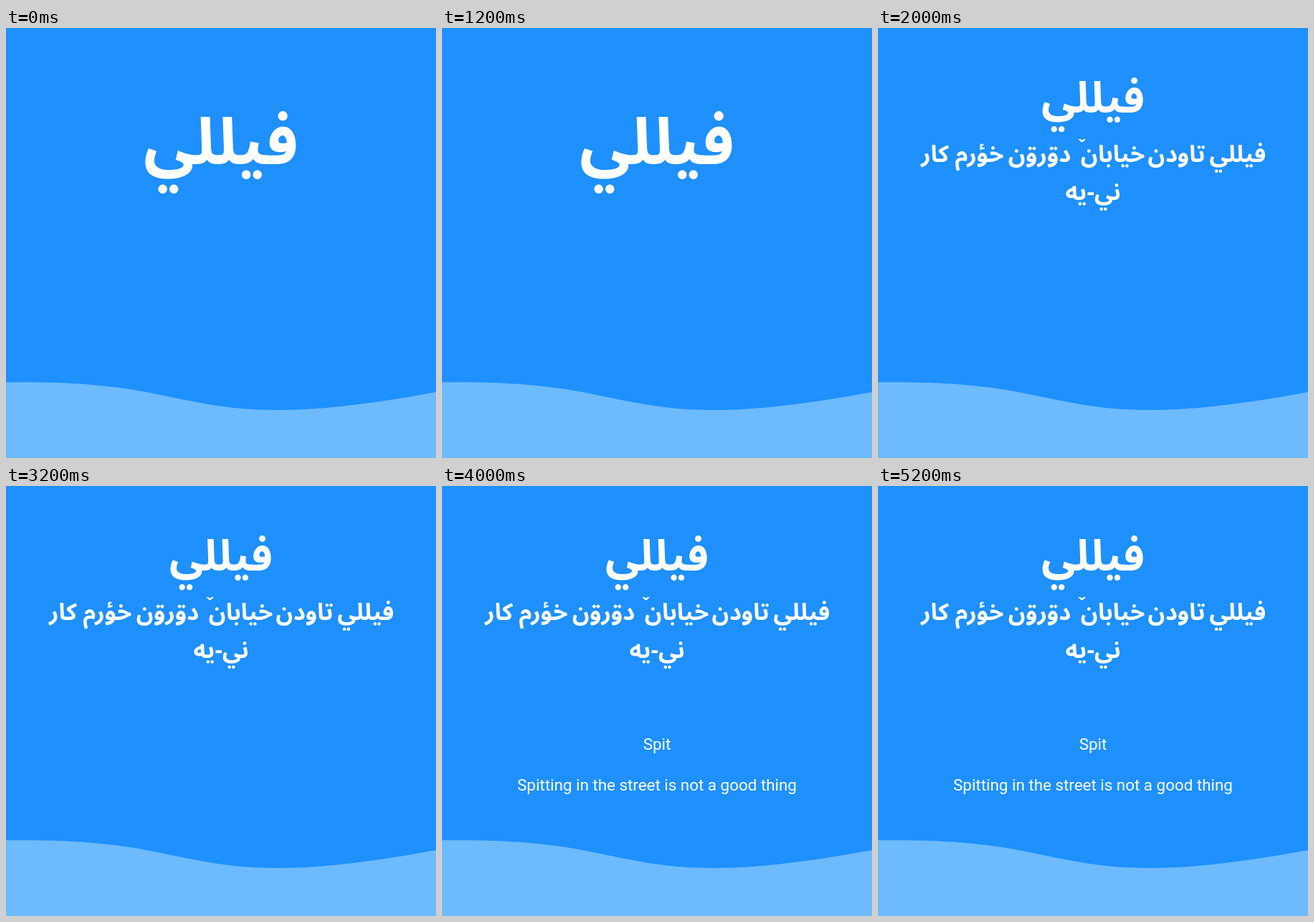
These frames come from a looping animation (600 by 600 pixels, 6000 ms). An HTML page:

```html
<!DOCTYPE html>
<html lang="en">
<head>
<meta charset="utf-8">
<title>Word card</title>
<style>
  html, body { margin: 0; width: 100%; height: 100%; overflow: hidden; background: #1e90ff; }
  svg { display: block; width: 100vw; height: 100vh; }
  text { fill: #fff; text-anchor: middle; }
  .fa {
    font-family: "Noto Sans Arabic", "DejaVu Sans Condensed", "DejaVu Sans", sans-serif;
    font-weight: 700;
    font-stretch: condensed;
    direction: rtl;
  }
  .en { font: 400 22.4px Roboto, sans-serif; }
  .caron { font: 700 28px Roboto, sans-serif; }
</style>
</head>
<body>
<svg viewBox="0 0 600 600">
  <rect width="600" height="600" fill="#1e90ff"/>
  <path fill="#6dbaff" d="M0 494.3C70 494 130 495.5 200 508.7C280 525 310 533 385 533C455 533 540 519 600 508V600H0Z"/>
  <text id="title" class="fa" x="300" y="190" font-size="86">فيللي</text>
  <g id="phrase"></g>
  <g id="english" class="en">
    <text x="300" y="368">Spit</text>
    <text x="300" y="425">Spitting in the street is not a good thing</text>
  </g>
</svg>
<script>
const NS = "http://www.w3.org/2000/svg";
const LOOP = 6000, STEP = 2000;
const [title, phrase, english] = ["title", "phrase", "english"].map(id => document.getElementById(id));

function add(name, attrs, content = "") {
  const el = document.createElementNS(NS, name);
  for (const key in attrs) el.setAttribute(key, attrs[key]);
  el.textContent = content;
  return phrase.appendChild(el);
}

// Sizes follow from the advance width of the headline word.
const large = 86 * 216 / title.getComputedTextLength();
const medium = large * 2 / 3;
const small = large * 0.365;

function word(content, x, y) {
  return add("text", { class: "fa", x, y, "font-size": small }, content);
}

// Two diamond dots over a waw, for fonts without the dotted letter.
function dots(text, index) {
  const box = text.getExtentOfChar(index);
  const x = box.x + box.width * 0.55;
  for (const dx of [-2.8, 2.8]) {
    add("path", { fill: "#fff", d: `M${x + dx} 165l3 3-3 3-3-3z` });
  }
}

word("فيللي", 502, 187);
word("تاودن", 416.5, 187);
word("خيابان", 327.5, 187);
add("text", { class: "caron", x: 284.5, y: 176 }, "ˇ");
const inside = word("دورون", 225.5, 187);
inside.setAttribute("aria-label", "دۊرۊن");
dots(inside, 1);
dots(inside, 3);
word("خؤرم", 141.5, 187);
word("كار", 79.5, 187);
word("ني-يه", 300, 240);

function show(el, on) {
  el.setAttribute("visibility", on ? "visible" : "hidden");
}

function draw(time) {
  const step = Math.floor(time % LOOP / STEP);
  title.setAttribute("y", step ? 118 : 190);
  title.setAttribute("font-size", step ? medium : large);
  show(phrase, step > 0);
  show(english, step > 1);
}

const start = performance.now();
function tick() {
  draw(performance.now() - start);
  requestAnimationFrame(tick);
}
tick();
</script>
</body>
</html>
```
